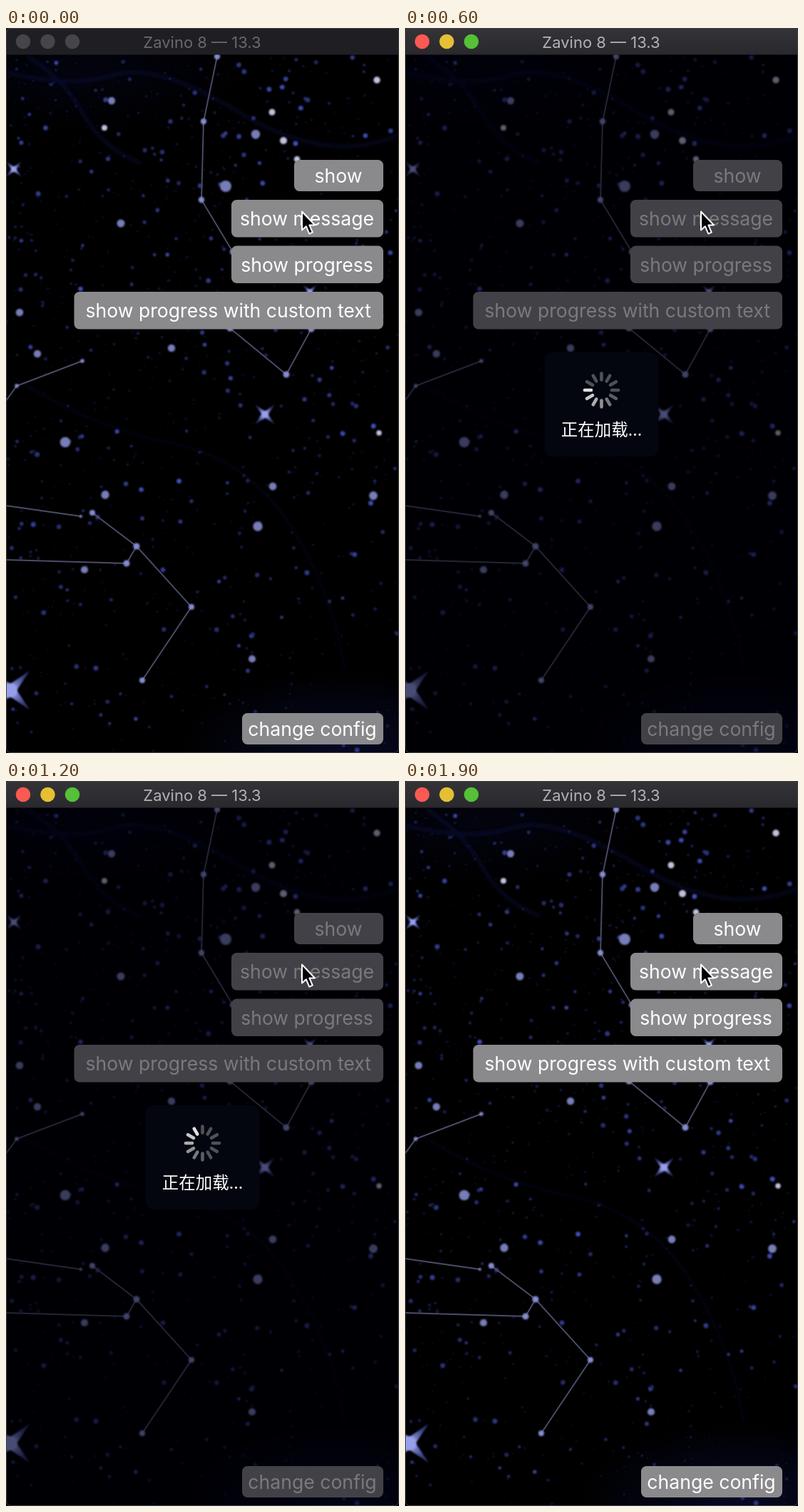
Animation of 551 by 1017 pixels, one loop 2 s. Source, as an HTML page:

```html
<!DOCTYPE html>
<html lang="zh-CN">
<head>
<meta charset="utf-8">
<title>Loading HUD</title>
<style>
  html, body { margin: 0; width: 100%; height: 100%; overflow: hidden; background: #000; }
  svg { display: block; width: 551px; height: 1017px; }
  text { text-anchor: middle; font-family: Inter, Roboto, sans-serif; }
  .label { font-size: 26.6px; fill: #fff; }
  .hud { font: 23.5px "Noto Sans CJK SC", "Noto Sans CJK", sans-serif; fill: #fff; }
</style>
</head>
<body>
<svg viewBox="0 0 551 1017" xmlns="http://www.w3.org/2000/svg">
  <defs>
    <linearGradient id="bar" x2="0" y2="1">
      <stop offset="0" stop-color="#343438"/><stop offset="1" stop-color="#29292d"/>
    </linearGradient>
    <radialGradient id="glow">
      <stop offset="0" stop-color="#0b0f3a"/><stop offset="1" stop-color="#0b0f3a" stop-opacity="0"/>
    </radialGradient>
    <radialGradient id="ray">
      <stop offset=".1" stop-color="#a9aff0"/><stop offset=".5" stop-color="#6a72bd"/><stop offset="1" stop-color="#343a78"/>
    </radialGradient>
    <filter id="soft" x="0" y="0" width="551" height="1017" filterUnits="userSpaceOnUse"><feGaussianBlur stdDeviation=".8"/></filter>
    <filter id="haze" x="0" y="0" width="551" height="1017" filterUnits="userSpaceOnUse"><feGaussianBlur stdDeviation="2.5"/></filter>
  </defs>
  <rect width="551" height="1017"/>
  <g fill="url(#glow)">
    <ellipse cx="110" cy="60" rx="240" ry="90" opacity=".25"/>
    <ellipse cx="470" cy="1010" rx="230" ry="110" opacity=".6"/>
  </g>
  <g fill="none" stroke="#141a60" stroke-width="4" opacity=".4" filter="url(#haze)">
    <path d="M0 62Q90 85 150 66T330 120T551 150"/>
    <path d="M30 40Q80 70 108 120T190 190"/>
    <path d="M10 490Q120 560 230 582T400 700T475 900" opacity=".5"/>
  </g>
  <g id="dust" filter="url(#soft)"></g>
  <g id="lines" fill="none" stroke="#4b4d68" stroke-width="1.9"></g>
  <g id="stars" filter="url(#soft)"></g>
  <g id="buttons"></g>
  <rect id="shade" y="37" width="551" height="980" fill="#000008" opacity=".52"/>
  <g id="panel">
    <rect id="box" y="455" height="146" rx="11" fill="#04060f"/>
    <g id="spinner" stroke="#fff" stroke-width="4.6" stroke-linecap="round"></g>
    <path id="tick" d="M248 512L266 530L303.5 492.500" fill="none" stroke="#fff" stroke-width="4" stroke-linecap="round"/>
    <text id="note" class="hud" x="275.500" y="572"></text>
  </g>
  <rect id="head" width="551" height="37.500"/>
  <g id="lights"></g>
  <text id="title" x="275" y="27.500" font-size="22">Zavino 8 — 13.3</text>
  <rect x=".5" y=".5" width="550" height="1016" rx="6" fill="none" stroke="#414148"/>
  <path d="M415 257.500V283.500L420.800 278.200L425.300 288.600L429.800 286.600L425.400 276.500H433Z" stroke="#fff" stroke-width="2" stroke-linejoin="round"/>
</svg>
<script>
const FRAME = 100, LOOP = 2000, SHOW = 1, DONE = 16, HIDE = 19;
const $ = id => document.getElementById(id);

function add(parent, tag, attrs, text) {
  const el = document.createElementNS('http://www.w3.org/2000/svg', tag);
  for (const key in attrs) el.setAttribute(key, attrs[key]);
  if (text) el.textContent = text;
  return parent.appendChild(el);
}

let seed = 71;
function rnd() {
  seed = (seed * 16807) % 2147483647;
  return seed / 2147483647;
}

const dot = (layer, cx, cy, r, fill) => add($(layer), 'circle', { cx, cy, r, fill });

// Faint field, denser towards the upper left; larger specks are rarer and brighter
function dust(count) {
  for (let i = 0; i < count; i++) {
    const x = 551 * rnd(), y = 38 + 979 * rnd(), size = rnd() ** 5, light = rnd();
    if (rnd() < .45 * y / 1017 + .15 * x / 551) continue;
    const level = 13 + 20 * light ** 2 + 18 * size;
    dot('dust', x.toFixed(1), y.toFixed(1), (.8 + 2.7 * size).toFixed(2), `hsl(234 48% ${level.toFixed(0)}%)`);
  }
}

// A chain of lines with a star on each joint that lies on the stage
function chain(r, ...points) {
  add($('lines'), 'path', { d: 'M' + points.join('L') });
  for (const [x, y] of points) if (x > 0) dot('stars', x, y, r, '#858cd0');
}

function sparkle(x, y, size) {
  let d = '';
  for (let i = 0; i < 8; i++) {
    const a = Math.PI / 4 * (i + 1), r = size * (i % 2 ? .24 : 1);
    d += (i ? 'L' : 'M') + (x + r * Math.cos(a)).toFixed(1) + ' ' + (y + r * Math.sin(a)).toFixed(1);
  }
  add($('stars'), 'path', { d: d + 'Z', fill: 'url(#ray)' });
  dot('stars', x, y, size * .27, '#979eea');
}

function button(x, y, h, label) {
  add($('buttons'), 'rect', { x, y, width: 529 - x, height: h, rx: 7.5, fill: '#8a898c' });
  add($('buttons'), 'text', { x: (x + 528) / 2, y: y + h / 2 + 10, class: 'label' }, label);
}

dust(2300);
chain(4.2, [296, 40], [277, 131], [274, 241], [318, 314]);
chain(4.5, [314, 421], [393, 486], [428, 422]);
chain(2.8, [0, 523], [15, 502], [107, 467]);
chain(2, [0, 670], [105, 685]);
chain(4, [121, 680], [183, 727], [260, 812], [191, 915]);
chain(4.5, [0, 746], [169, 751], [183, 727]);

const bright = [[308, 222], [83, 581], [353, 699], [350, 149], [515, 656], [139, 655], [161, 274], [374, 643],
  [19, 399], [44, 457], [232, 449], [148, 102], [110, 760], [345, 885]];
bright.forEach(([x, y], i) => dot('stars', x, y, 5 + 3 * .75 ** i, '#777db8'));
const white = [[389, 158], [520, 73], [373, 118], [408, 184], [138, 140], [523, 568]];
white.forEach(([x, y], i) => dot('stars', x, y, 5 - .25 * i, '#bfc2dc'));

sparkle(11, 198, 15);
sparkle(363, 542, 19);
sparkle(6, 929, 38);
sparkle(426, 370, 13);

button(404, 185, 44, 'show');
['show message', 'show progress', 'show progress with custom text'].forEach((label, i) =>
  button(i < 2 ? 316 : 95.5, 241 + 64.5 * i, 52.5, label));
button(331, 961, 44, 'change config');

const lights = [0, 1, 2].map(i => dot('lights', 24 + 34.5 * i, 19, 10.3));
const spokes = Array.from({ length: 12 }, (_, i) =>
  add($('spinner'), 'path', { d: 'M0 -14.5V-23.5', transform: `translate(275.5 508) rotate(${30 * i})` }));

const show = (el, on) => el.setAttribute('display', on ? 'inline' : 'none');

function draw(n) {
  const active = n >= SHOW, busy = active && n < HIDE, done = busy && n >= DONE;
  const colors = ['#fb5a53', '#e5c034', '#55c038'];
  lights.forEach((el, i) => el.setAttribute('fill', active ? colors[i] : '#46464a'));
  $('head').setAttribute('fill', active ? 'url(#bar)' : '#1f1f23');
  $('title').setAttribute('fill', active ? '#b3b3b6' : '#69696c');
  show($('shade'), busy);
  show($('panel'), busy);
  show($('spinner'), !done);
  show($('tick'), done);
  const width = done ? 146 : 159.5;
  $('box').setAttribute('x', 275.5 - width / 2);
  $('box').setAttribute('width', width);
  $('note').textContent = done ? '处理完毕' : '正在加载...';

  // The spinner is sampled sparsely, so it skips over four spokes per step
  const lead = Math.floor(11.3 + 4.38 * (n - SHOW));
  spokes.forEach((el, i) => {
    const lag = (((lead - i) % 12) + 12) % 12;
    el.setAttribute('stroke-opacity', Math.max(.3, .88 - .105 * lag));
  });
}

let last = -1;
const start = performance.now();
function tick() {
  const n = Math.floor(((performance.now() - start) % LOOP) / FRAME);
  if (n !== last) draw(last = n);
  requestAnimationFrame(tick);
}
tick();
</script>
</body>
</html>
```
